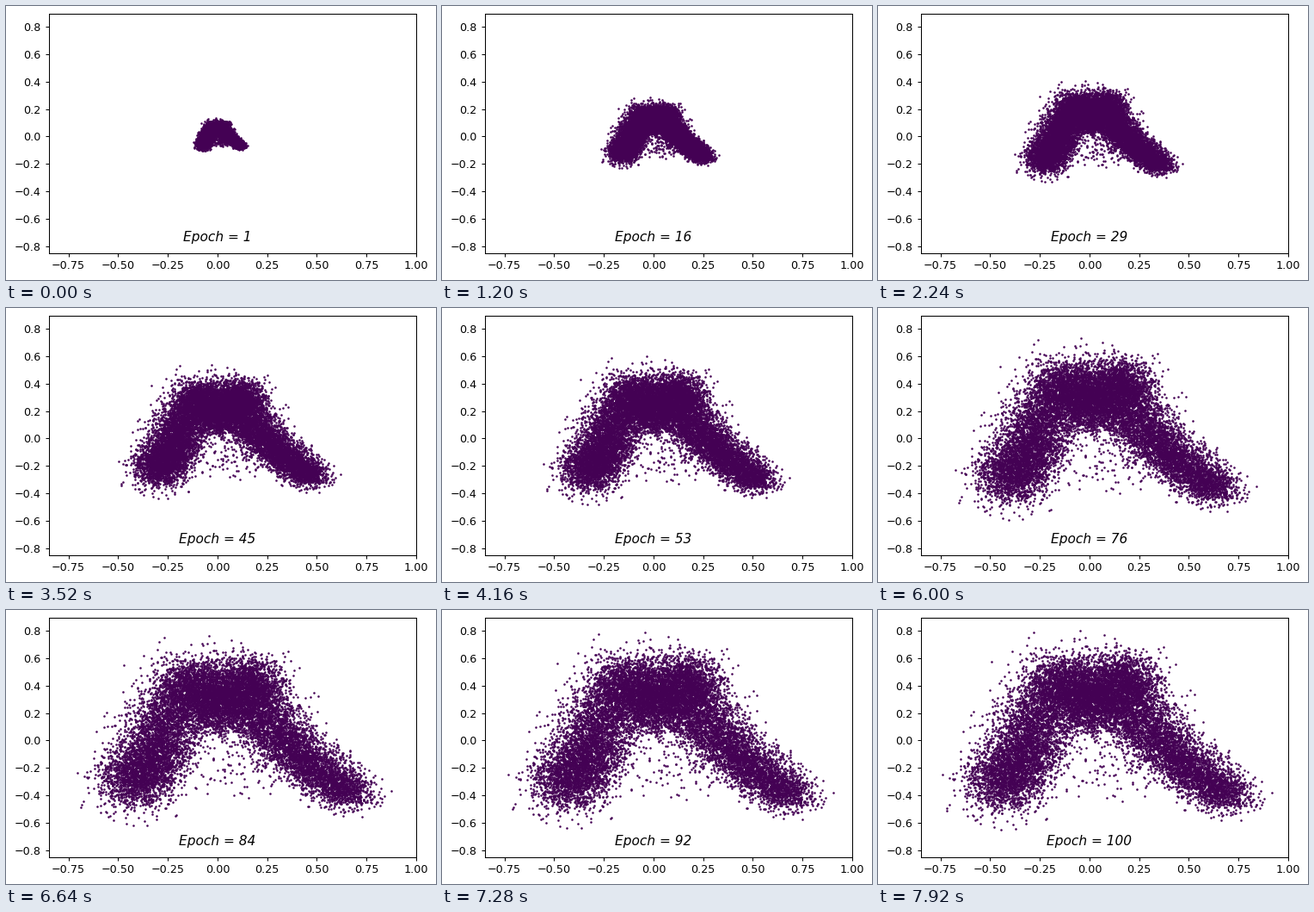
These frames come from a looping animation (500 px wide and 318 px high, 8000 ms). A matplotlib script:

```python
import numpy as np
import matplotlib.pyplot as plt
from matplotlib.animation import FuncAnimation

W, H, DPI = 500, 318, 100
EPOCHS = 100
POINTS = 14000
STRAYS = 50
START_SCALE = 0.165

plt.rcParams.update({
    "font.family": "DejaVu Sans",
    "font.size": 9.2,
    "axes.linewidth": 0.736,
    "xtick.major.size": 3.22, "ytick.major.size": 3.22,
    "xtick.major.pad": 3.22, "ytick.major.pad": 3.22,
    "xtick.major.width": 0.736, "ytick.major.width": 0.736,
})

# Ridge of the final cloud: two arms joined by a dip between two humps
RIDGE_X = [-0.45, -0.31, -0.14, 0.03, 0.16, 0.27, 0.48, 0.73]
RIDGE_Y = [-0.36, -0.02, 0.48, 0.20, 0.50, 0.10, -0.18, -0.43]


def make_cloud(rng):
    """Scatter points around the ridge, denser on the left, slimmer on the right."""
    last = len(RIDGE_X) - 1
    t = last * rng.random(POINTS) ** 1.2
    knots = np.arange(last + 1)
    ridge = np.column_stack([np.interp(t, knots, RIDGE_X),
                             np.interp(t, knots, RIDGE_Y)])
    width = 0.1 - 0.035 * (t / last) ** 4
    body = ridge + rng.normal(size=(POINTS, 2)) * width[:, None]
    strays = rng.normal((0.08, -0.25), (0.08, 0.09), (STRAYS, 2))
    return np.vstack([body, strays])


def scale_at(i):
    """Growth of the cloud, slowing towards the last epoch."""
    u = i / (EPOCHS - 1)
    return START_SCALE + (1 - START_SCALE) * (1 - (1 - u) ** 1.6)


cloud = make_cloud(np.random.default_rng(7))

fig = plt.figure(figsize=(W / DPI, H / DPI), dpi=DPI, facecolor="white")
ax = fig.add_axes([49.5 / W, 31.5 / H, 427.5 / W, 278 / H])
ax.set_xlim(-0.85, 1.0)
ax.set_ylim(-0.85, 0.9)
ax.set_xticks(np.arange(-3, 5) * 0.25)
ax.set_yticks(np.arange(-4, 5) * 0.2)

dots, = ax.plot([], [], "o", color="#440154", ms=1.85, mew=0)
label = ax.text(0, -0.765, "", ha="center", va="baseline",
                style="italic", fontsize=11.04)


def draw(i):
    pts = cloud * scale_at(i)
    dots.set_data(pts[:, 0], pts[:, 1])
    label.set_text(f"Epoch = {i + 1}")
    return dots, label


anim = FuncAnimation(fig, draw, frames=EPOCHS, interval=80,
                     repeat=True, repeat_delay=0)
plt.show()
```
